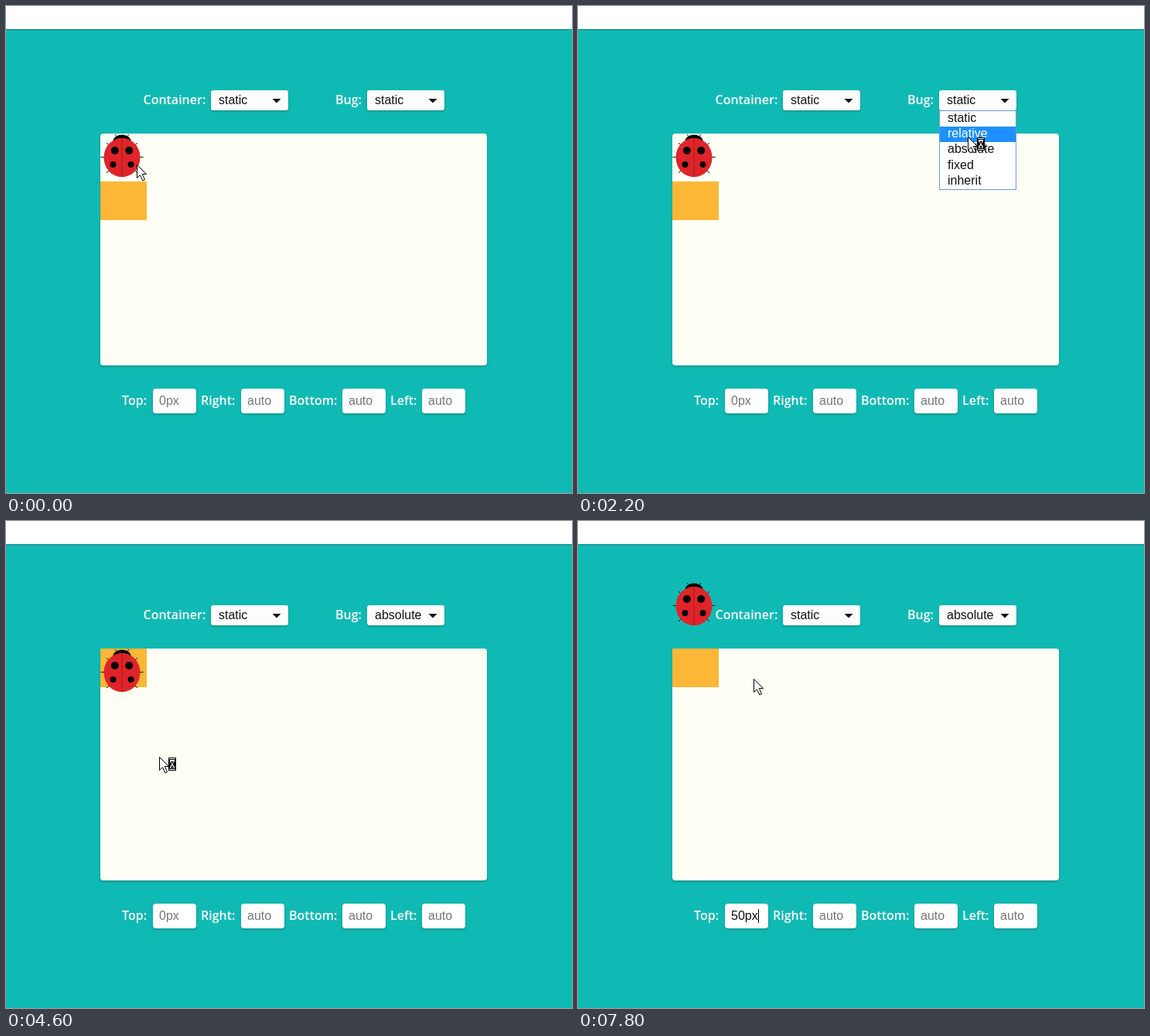
An HTML page with a canvas for the animation above (8 s loop, 732x630 px).

```html
<!DOCTYPE html>
<html lang="en">
<head>
<meta charset="utf-8">
<title>CSS position demo</title>
<style>
  html, body { margin: 0; width: 100%; height: 100%; overflow: hidden; background: #10bab4; }
  canvas { display: block; }
</style>
</head>
<body>
<canvas id="stage" width="732" height="630"></canvas>
<script>
const ctx = document.getElementById('stage').getContext('2d');
const LOOP = 8000, STEP = 200;
const SANS = '16px "Liberation Sans", Arial, sans-serif';
const LABEL = '600 16px "Open Sans", sans-serif';
const TEAL = '#10bab4', GREY = '#757575', INK = '#111';
const OPTIONS = ['static', 'relative', 'absolute', 'fixed', 'inherit'];
const ROW_Y = [150, 170, 190, 211, 231];

// time, x, y of the pointer's hot spot
const PATH = [
  [0, 169, 205], [200, 172, 204], [1200, 505, 126], [1400, 505, 130], [1600, 505, 134],
  [1800, 505, 142], [2200, 504, 169], [2600, 504, 184], [2800, 504, 184],
  [3600, 184, 191], [3800, 183, 191], [4200, 183, 192], [5200, 225, 514],
  [6900, 225, 514], [7400, 227, 208], [7800, 227, 204], [8000, 227, 204]
];

// time, value typed into the first field
const TYPED = [[0, ''], [6000, '5'], [6200, '50'], [6600, '50p'], [6800, '50px']];

function pointerAt(t) {
  let i = 0;
  while (i < PATH.length - 2 && t >= PATH[i + 1][0]) i++;
  const [t0, x0, y0] = PATH[i], [t1, x1, y1] = PATH[i + 1];
  const p = (t - t0) / (t1 - t0), e = p * p * (3 - 2 * p);
  return [Math.round(x0 + (x1 - x0) * e), Math.round(y0 + (y1 - y0) * e)];
}

function rect(x, y, w, h, color) {
  ctx.fillStyle = color;
  ctx.fillRect(x, y, w, h);
}

function text(str, x, y, color, font = SANS) {
  ctx.font = font;
  ctx.fillStyle = color;
  ctx.fillText(str, x, y);
}

function panel(x, y, w, h, r, color) {
  ctx.save();
  ctx.shadowColor = 'rgba(0,0,0,0.24)';
  ctx.shadowBlur = 3;
  ctx.shadowOffsetY = 1.5;
  ctx.fillStyle = color;
  ctx.beginPath();
  ctx.roundRect(x, y, w, h, r);
  ctx.fill();
  ctx.restore();
}

function poly(points, fill, stroke) {
  ctx.beginPath();
  points.forEach(([x, y]) => ctx.lineTo(x, y));
  ctx.closePath();
  if (fill) { ctx.fillStyle = fill; ctx.fill(); }
  if (stroke) { ctx.strokeStyle = stroke; ctx.lineWidth = 1; ctx.stroke(); }
}

function oval(x, y, rx, ry, color) {
  ctx.fillStyle = color;
  ctx.beginPath();
  ctx.ellipse(x, y, rx, ry, 0, 0, Math.PI * 2);
  ctx.fill();
}

function line(x0, y0, x1, y1, color, width = 1) {
  ctx.strokeStyle = color;
  ctx.lineWidth = width;
  ctx.beginPath();
  ctx.moveTo(x0, y0);
  ctx.lineTo(x1, y1);
  ctx.stroke();
}

function select(label, labelX, x, value) {
  text(label, labelX, 127, '#fff', LABEL);
  panel(x, 109, 100, 26, 3, '#fdfdfd');
  text(value, x + 10, 127, INK);
  poly([[x + 79.5, 120], [x + 90.5, 120], [x + 85, 125.5]], INK);
}

function field(label, labelX, x, hint, value) {
  text(label, labelX, 516, '#fff', LABEL);
  panel(x, 495, 56, 32, 4, '#fff');
  text(value || hint, x + 8, 516, value ? INK : GREY);
}

function bug(x, y) {
  ctx.save();
  ctx.translate(x, y);
  for (const s of [-1, 1]) {
    line(s * 5, -25, s * 9, -30, '#111');
    line(s * 22, -0.5, s * 27.5, -0.5, '#111');
    line(s * 14, -13, s * 20, -19, '#111');
    line(s * 14, 14, s * 20, 20, '#111');
  }
  oval(0, -20, 11.8, 9.5, '#000');
  oval(0, 0, 23.5, 25.3, '#df2529');
  line(0, -25, 0, 25, '#a8191d');
  for (const s of [-1, 1]) {
    oval(s * 9.2, -9, 5, 5, '#000');
    oval(s * 11.5, 9, 4, 4, '#000');
  }
  ctx.restore();
}

function menu(active, opening) {
  ctx.save();
  if (opening) {
    ctx.globalAlpha = 0.52;
    ctx.translate(517, 186.5);
    ctx.scale(0.975, 0.975);
    ctx.translate(-517, -186.5);
  }
  rect(467, 135, 100, 103, opening ? '#a9a9c8' : '#7099d2');
  rect(468, 136, 98, 101, '#fff');
  rect(468, ROW_Y[active] - 14, 98, 20, '#1e90ff');
  OPTIONS.forEach((name, i) => text(name, 478, ROW_Y[i], i === active ? '#fff' : INK));
  ctx.restore();
}

function hourglass(x, y) {
  rect(x, y, 10, 17, '#000');
  rect(x + 1, y + 1, 8, 1, '#fff');
  rect(x + 1, y + 15, 8, 1, '#fff');
  poly([[x + 2, y + 3], [x + 8, y + 3], [x + 8, y + 5], [x + 5.5, y + 8.5], [x + 8, y + 12],
    [x + 8, y + 14], [x + 2, y + 14], [x + 2, y + 12], [x + 4.5, y + 8.5], [x + 2, y + 5]], '#fff');
  poly([[x + 3, y + 5], [x + 7, y + 5], [x + 5, y + 8]], '#000');
  poly([[x + 5, y + 10], [x + 7.5, y + 13.5], [x + 2.5, y + 13.5]], '#000');
}

function arrow(x, y) {
  poly([[0, 0], [0, 17], [4, 13.2], [7.3, 20.5], [10, 19.3], [6.8, 12], [12, 12]]
    .map(([dx, dy]) => [x + 0.5 + dx, y + 0.5 + dy]), '#fff', '#000');
}

function beam(x, y) {
  rect(x, y - 7, 1, 15, '#000');
  for (const dy of [-8, 8]) {
    rect(x - 3, y + dy, 3, 1, '#000');
    rect(x + 1, y + dy, 3, 1, '#000');
  }
}

function pointer(t) {
  const [x, y] = pointerAt(t);
  if (y >= 495 && y <= 527) return beam(x, y);
  arrow(x, y);
  if (t >= 1400 && t < 5200) hourglass(x + 12, y + 1);
}

function draw(t) {
  const picked = t >= 2600;
  const value = TYPED.filter(([at]) => t >= at).pop()[1];
  const moved = value === '50px';

  rect(0, 0, 732, 630, TEAL);
  rect(0, 0, 732, 30, '#fff');
  rect(0, 30, 732, 1, '#0b7773');

  select('Container:', 177.5, 265, 'static');
  select('Bug:', 426, 467, picked ? 'absolute' : 'static');

  panel(122, 165, 500, 300, 4, '#fffff6');
  rect(122, picked ? 165 : 227, 60, 50, '#fcb737');
  bug(150, moved ? 110 : 196);

  field('Top:', 150, 190, '0px', value);
  field('Right:', 252, 304, 'auto');
  field('Bottom:', 366, 435, 'auto');
  field('Left:', 497, 538, 'auto');

  const typing = t >= 6000 && t < 7000;
  if (t >= 5200 && (typing || (t - 5200) % 1000 < 500 || t >= 7800)) {
    ctx.font = SANS;
    const end = value ? Math.round(ctx.measureText(value).width) : 0;
    rect(198 + end, 502, 1, 18, '#000');
  }

  if (t >= 1600 && t < 2600) menu(t < 2000 ? 0 : t < 2400 ? 1 : 2, t < 1800);
  pointer(t);
}

let start = null;
function tick(now) {
  if (start === null) start = now;
  const t = (now - start) % LOOP;
  draw(Math.floor(t / STEP) * STEP);
  requestAnimationFrame(tick);
}
draw(0);
requestAnimationFrame(tick);
</script>
</body>
</html>
```
